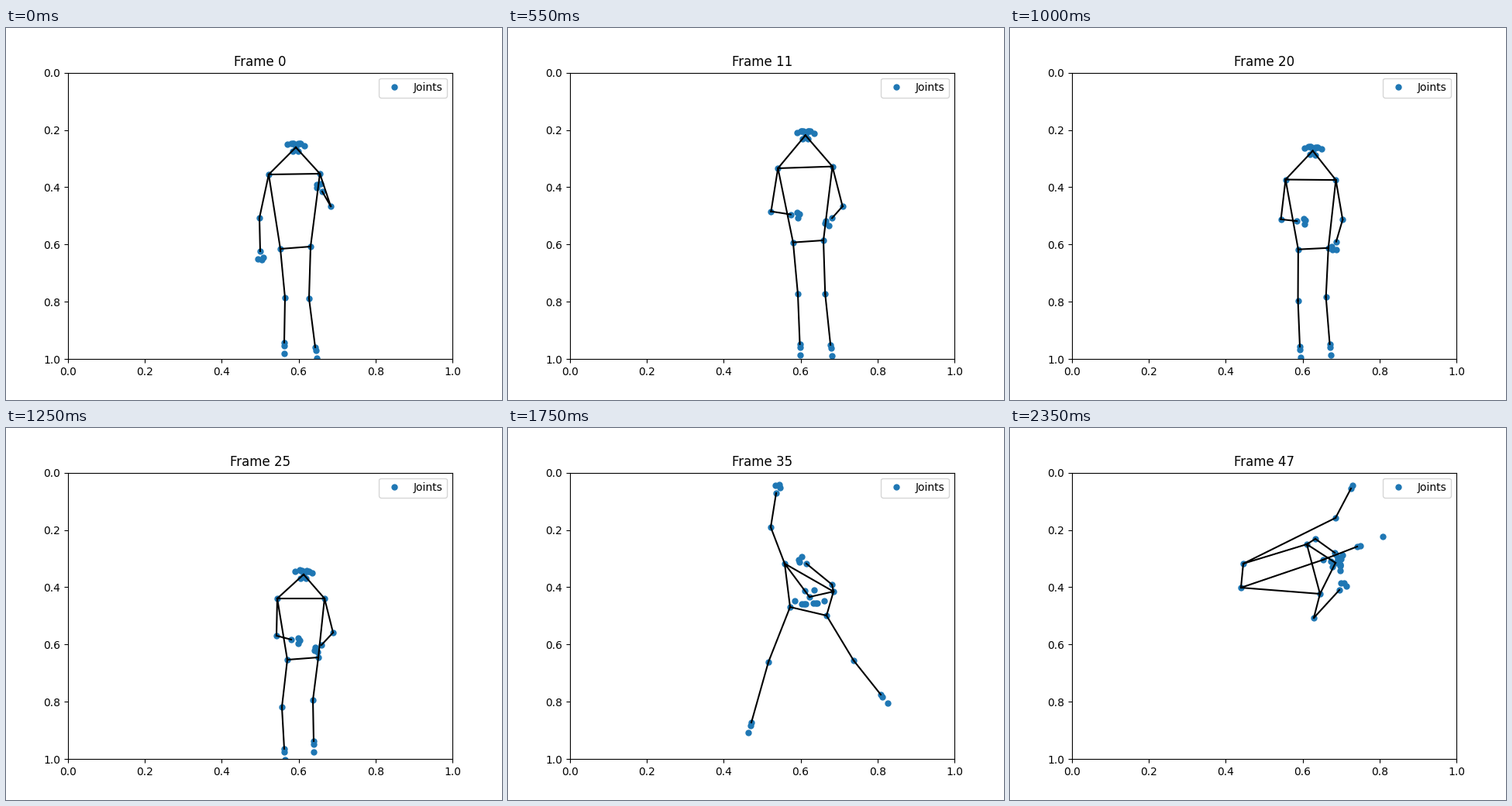
These frames come from a looping animation (640x480 px, 2400 ms). A matplotlib script:

```python
import numpy as np
import matplotlib.pyplot as plt
from matplotlib.animation import FuncAnimation

FRAMES, STEP = 48, 50
W, H = 640, 480

# Key poses in stage pixels: the nose, then for each side
# shoulder, elbow, wrist, hip, knee, ankle.
POSES = {
    0: [(374, 154),
        (339, 189), (327, 245), (328, 288), (354, 285), (360, 348), (359, 406),
        (405, 188), (419, 230), (408, 211), (393, 282), (391, 349), (399, 412)],
    7: [(374, 142),
        (339, 185), (331, 242), (359, 249), (359, 278), (366, 342), (369, 407),
        (411, 180), (429, 227), (407, 224), (399, 274), (403, 342), (409, 407)],
    16: [(396, 134),
         (360, 176), (350, 230), (372, 230), (379, 275), (384, 345), (386, 409),
         (428, 177), (435, 234), (432, 272), (417, 274), (417, 344), (425, 411)],
    25: [(384, 189),
         (350, 220), (349, 268), (368, 273), (363, 299), (356, 360), (359, 414),
         (411, 220), (422, 264), (407, 280), (403, 296), (396, 351), (397, 404)],
    29: [(370, 216),
         (341, 237), (325, 291), (319, 343), (354, 328), (319, 336), (334, 367),
         (411, 245), (445, 287), (447, 306), (402, 327), (419, 316), (409, 365)],
    35: [(389, 218),
         (357, 175), (339, 128), (346, 84), (364, 231), (336, 302), (314, 380),
         (420, 211), (418, 202), (385, 175), (411, 242), (446, 300), (481, 344)],
    47: [(420, 174),
         (383, 150), (394, 143), (419, 161), (301, 175), (420, 116), (440, 78),
         (400, 214), (392, 245), (425, 209), (298, 206), (404, 170), (448, 153)],
}
KEYS = list(POSES)
TRACKS = np.array(list(POSES.values()), float).reshape(len(KEYS), -1).T

# Half a face as (sideways, up) from the nose: three eye points, ear, mouth
FACE = [(3, 5), (4.5, 5), (6, 5), (11, 3), (3.5, -5)]
# Little finger, index finger, thumb as (forward, towards the nose) from the wrist
HAND = [(10, -3), (11, 2), (8, 4)]


def unit(v):
    return v / max(np.hypot(*v), 1e-6)


def normal(v, toward):
    """Unit vector square to v, on the side that toward points to."""
    n = unit(np.array([-v[1], v[0]]))
    return n if n @ toward >= 0 else -n


def face(nose, a, b, size):
    up = unit(nose - (a + b) / 2)
    side = normal(up, b - a)
    return [nose + size * (s * x * side + y * up)
            for s in (-1, 1) for x, y in FACE]


def hand(elbow, wrist, nose):
    ahead = unit(wrist - elbow)
    inward = normal(ahead, nose - wrist)
    return [wrist + x * ahead + y * inward for x, y in HAND]


def foot(knee, ankle, length):
    ahead = unit(ankle - knee)
    return [ankle + 4 * ahead, ankle + length * ahead]


def to_axes(points):
    """Stage pixels to the unit square of the plot."""
    return (np.array(points) - (0.125 * W, 0.12 * H)) / (0.775 * W, 0.77 * H)


def pose(i):
    """All joints and the bone polyline, with gaps, at frame i."""
    points = np.reshape([np.interp(i, KEYS, t) for t in TRACKS], (-1, 2))
    nose, a, b = points[0], points[1:7], points[7:]

    # The head and then the feet come closer to the camera.
    head_size = 1 + 0.7 * np.exp(-((i - 35) / 4) ** 2)
    foot_length = np.interp(i, [35, 47], [14, 35])

    joints = [*points, *face(nose, a[0], b[0], head_size)]
    bones = [(a[0], b[0]), (a[3], b[3])]
    for side in (a, b):
        shoulder, elbow, wrist, hip, knee, ankle = side
        joints += hand(elbow, wrist, nose) + foot(knee, ankle, foot_length)
        bones += [(nose, shoulder), (shoulder, elbow), (elbow, wrist),
                  (shoulder, hip), (hip, knee), (knee, ankle)]
    gap = (np.nan, np.nan)
    return to_axes(joints), to_axes([p for bone in bones for p in (*bone, gap)])


fig, ax = plt.subplots(figsize=(W / 100, H / 100), dpi=100)
ax.set_xlim(0, 1)
ax.set_ylim(1, 0)
dots, = ax.plot([], [], "o", ms=5, color="C0", label="Joints")
lines, = ax.plot([], [], "k-", lw=1.5)
title = ax.set_title("Frame 0")
ax.legend(loc="upper right")


def draw(i):
    joints, bones = pose(i)
    dots.set_data(*joints.T)
    lines.set_data(*bones.T)
    title.set_text(f"Frame {i}")
    return dots, lines, title


anim = FuncAnimation(fig, draw, frames=FRAMES, interval=STEP,
                     repeat=True, repeat_delay=0, blit=False)
plt.show()
```
